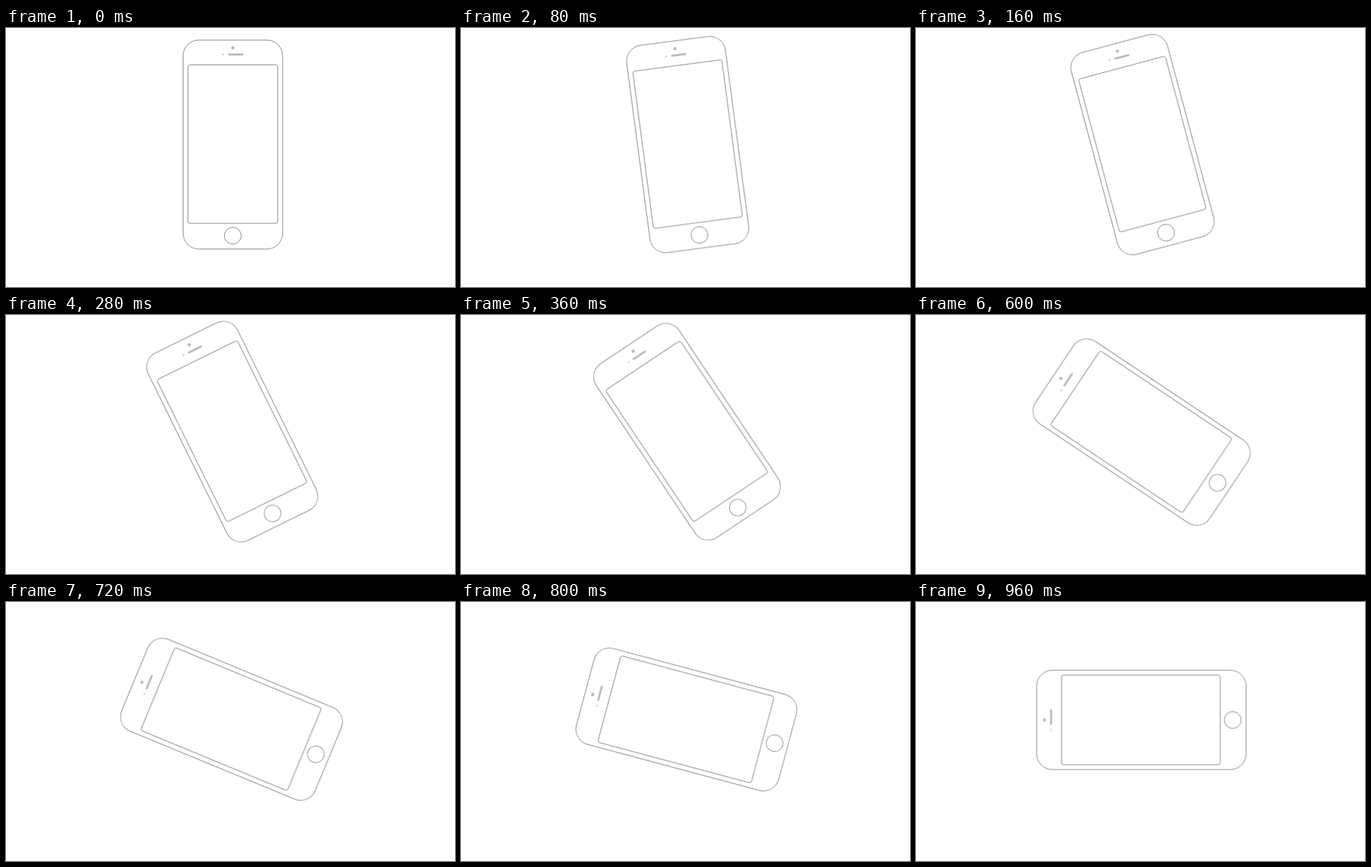
These frames come from a looping animation (640x370 px, 1.44 s). An HTML page:

```html
<!DOCTYPE html>
<html lang="en">
<head>
<meta charset="utf-8">
<title>Phone rotation</title>
<style>
  html, body {
    margin: 0;
    height: 100%;
    overflow: hidden;
    background: #fff;
  }
  svg { display: block; }
  .phone {
    transform-origin: 323.2px 168.5px;
    animation: turn 1440ms infinite;
  }
  .line { fill: none; stroke: #868686; stroke-width: 1; }
  .dot { fill: #b4b4b4; }

  /* 24 ticks of 40 ms, 3.75 degrees each, then a rest on the side */
  @keyframes turn {
    0% { transform: rotate(0deg); animation-timing-function: steps(24, end); }
    66.6666%, 100% { transform: rotate(-90deg); }
  }
</style>
</head>
<body>
<svg width="640" height="370" viewBox="0 0 640 370">
  <g class="phone">
    <g class="line">
      <rect x="252.4" y="17.2" width="141.9" height="298.6" rx="22.5"/>
      <rect x="259.3" y="52.7" width="128" height="226.3" rx="3"/>
      <circle cx="323.2" cy="296.7" r="12"/>
    </g>
    <g class="dot">
      <circle cx="323.3" cy="28.3" r="2.2"/>
      <circle cx="309.3" cy="37.8" r="1.1"/>
      <rect x="316.4" y="36.4" width="22.2" height="2.9" rx="1.45"/>
    </g>
  </g>
</svg>
</body>
</html>
```
